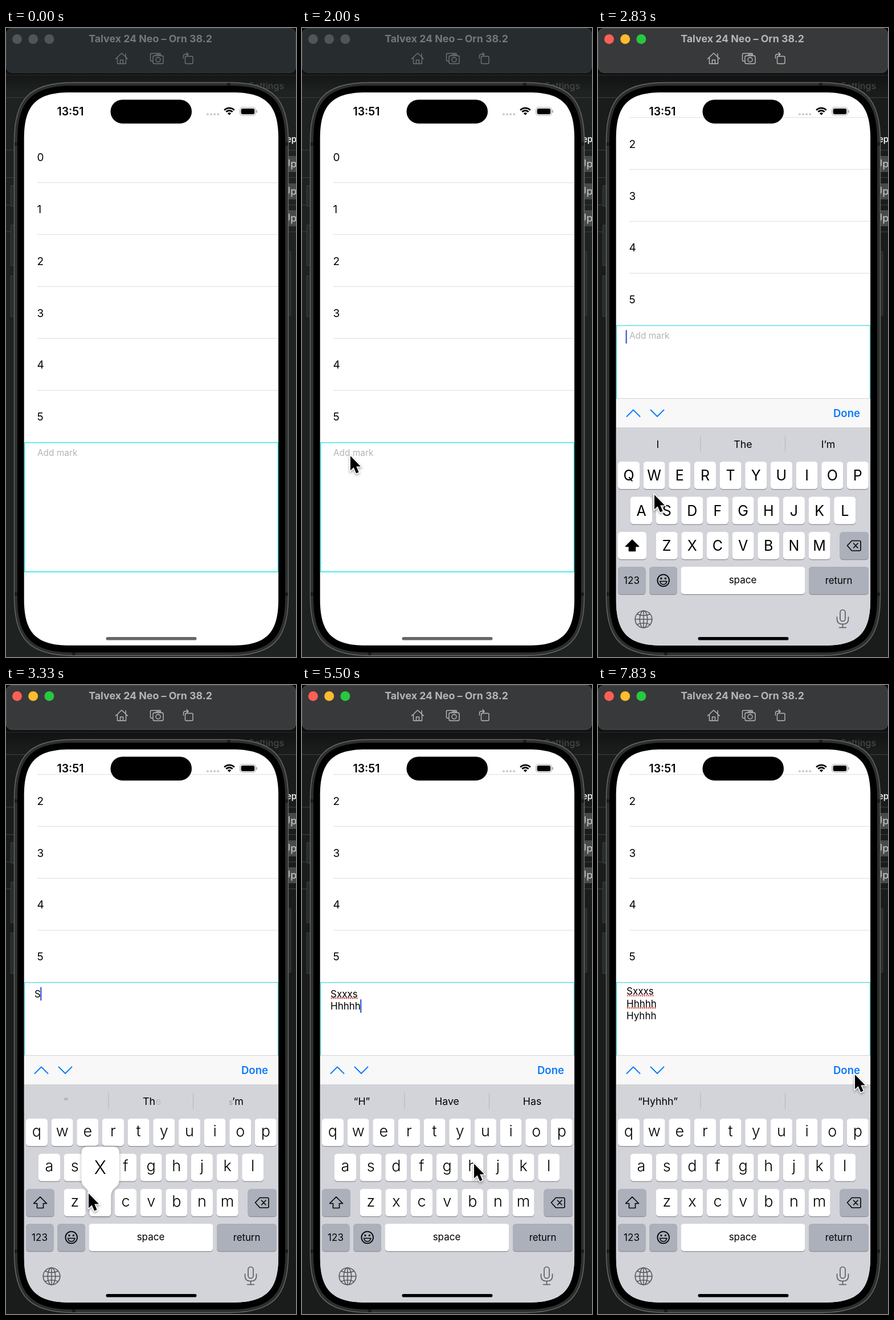
Recreate the animation shown at these times as an HTML page with a canvas. Size 509 by 1101 pixels, loop 8000 ms.

```html
<!DOCTYPE html>
<html lang="en">
<head>
<meta charset="utf-8">
<title>Text entry demo</title>
<style>
  html, body { margin: 0; width: 100%; height: 100%; overflow: hidden; background: #1b1e1e; }
  canvas { display: block; }
</style>
</head>
<body>
<canvas id="stage" width="509" height="1101"></canvas>
<script>
const ctx = document.getElementById('stage').getContext('2d');
const LOOP = 8000, STEPS_PER_MS = 6 / 1000;
const BLUE = '#0a7aff', KEY_GRAY = '#abb0bb', FONT = 'Inter, "Liberation Sans", sans-serif';
const ROWS = [
  { keys: 'qwertyuiop', x: 35, y: 759 },
  { keys: 'asdfghjkl', x: 57, y: 820.5 },
  { keys: 'zxcvbnm', x: 101.7, y: 882 }
];
const PITCH = 44.65, KEY_W = 38, KEY_H = 48;

// Pointer waypoints: step, x, y
const POINTER = [
  [1, 448, 1060], [8, 262, 935], [12, 84, 747], [15, 73, 743], [17, 98, 815],
  [19, 112, 846], [20, 144, 888], [23, 146, 890], [24, 112, 845], [25, 130, 850],
  [27, 415, 962], [28, 380, 930], [29, 302, 838], [33, 301, 836], [34, 370, 900],
  [35, 455, 964], [36, 450, 962], [37, 340, 870], [38, 298, 842], [39, 272, 785],
  [40, 290, 815], [41, 300, 846], [44, 301, 850], [46, 430, 705], [47, 450, 680]
];
const TYPED = [
  [0, ''], [20, 'S'], [21, 'Sx'], [22, 'Sxx'], [23, 'Sxxx'], [25, 'Sxxxs'], [28, 'Sxxxs\n'],
  [30, 'Sxxxs\nH'], [31, 'Sxxxs\nHh'], [32, 'Sxxxs\nHhhh'], [33, 'Sxxxs\nHhhhh'],
  [36, 'Sxxxs\nHhhhh\n'], [38, 'Sxxxs\nHhhhh\nH'], [40, 'Sxxxs\nHhhhh\nHy'],
  [42, 'Sxxxs\nHhhhh\nHyh'], [43, 'Sxxxs\nHhhhh\nHyhh'], [44, 'Sxxxs\nHhhhh\nHyhhh']
];
const STARTERS = ['I', 'The', 'I’m'];
const HINTS = [
  [0, STARTERS], [21, ['“Sx”', '', '']], [25, ['“Sxxxs”', '', '']], [28, STARTERS],
  [30, ['“H”', 'Have', 'Has']], [36, STARTERS], [38, ['“H”', 'How', 'He']],
  [42, ['“Hyh”', '', '']], [44, ['“Hyhhh”', '', '']]
];
const PRESSED = { 19: 'S', 20: 'X', 22: 'x', 24: 's', 29: 'H', 31: 'h', 39: 'y', 41: 'h', 43: 'h' };
const SCROLL = { 15: 54, 16: 183 }, SLIDE = { 15: 249, 16: 38 };

const latest = (list, step) => list.filter(e => e[0] <= step).pop()[1];

function text(str, x, y, size, color = '#000', weight = 400, align = 'left') {
  ctx.font = `${weight} ${size}px ${FONT}`;
  ctx.textAlign = align;
  ctx.fillStyle = color;
  ctx.fillText(str, x, y);
}
function rect(x, y, w, h, color) {
  ctx.fillStyle = color;
  ctx.fillRect(x, y, w, h);
}
function round(x, y, w, h, r, fill, stroke, width = 1) {
  ctx.beginPath();
  ctx.roundRect(x, y, w, h, r);
  paint(fill, stroke, width);
}
function paint(fill, stroke, width = 1) {
  if (fill) { ctx.fillStyle = fill; ctx.fill(); }
  if (stroke) { ctx.strokeStyle = stroke; ctx.lineWidth = width; ctx.stroke(); }
}
function disc(x, y, r, fill, stroke, width) {
  ctx.beginPath();
  ctx.arc(x, y, r, 0, Math.PI * 2);
  paint(fill, stroke, width);
}
function line(d, color, width = 1.6, fill) {
  ctx.lineJoin = ctx.lineCap = 'round';
  const path = new Path2D(d);
  if (fill) { ctx.fillStyle = fill; ctx.fill(path); }
  ctx.strokeStyle = color;
  ctx.lineWidth = width;
  ctx.stroke(path);
}

// Rounded rectangle with continuous-curvature corners
function smoothRect(x, y, w, h, r) {
  const e = r * 1.3, c = e * 0.269, R = x + w, B = y + h;
  ctx.beginPath();
  ctx.moveTo(x + e, y);
  ctx.lineTo(R - e, y);
  ctx.bezierCurveTo(R - c, y, R, y + c, R, y + e);
  ctx.lineTo(R, B - e);
  ctx.bezierCurveTo(R, B - c, R - c, B, R - e, B);
  ctx.lineTo(x + e, B);
  ctx.bezierCurveTo(x + c, B, x, B - c, x, B - e);
  ctx.lineTo(x, y + e);
  ctx.bezierCurveTo(x, y + c, x + c, y, x + e, y);
  ctx.closePath();
}

function drawBackdrop(active) {
  rect(0, 0, 509, 1101, active ? '#1a1c1c' : '#1e2221');
  for (const y of [82, 121, 213, 261, 309, 356]) rect(0, y, 509, 1.5, '#343737');
  text('Settings', 488, 107, 16, '#4b4e4e', 500, 'right');
  text('ep', 492, 200, 15, '#eee', 600);
  for (const y of [224, 272, 319]) {
    rect(490, y, 19, 28, '#484a4a');
    text('Up', 486, y + 20, 18, '#bfc0c0', 500);
  }
  for (const [y, h] of [[276, 36], [345, 71], [434, 71]]) round(8.5, y, 20, h, 1, '#282b2b', '#414444');
  round(480, 391, 20, 112, 1, '#282b2b', '#3b3e3e');
  const shade = ctx.createLinearGradient(0, 70, 0, 112);
  shade.addColorStop(0, 'rgba(0,0,0,.5)');
  shade.addColorStop(1, 'rgba(0,0,0,0)');
  rect(0, 70, 509, 42, shade);
}

function drawTitleBar(active) {
  const ink = active ? '#b9baba' : '#6f7375';
  rect(0, 0, 509, 10, '#0c0e0e');
  round(0.5, 0.5, 508, 77.5, 10, active ? '#38393a' : '#272c2e', active ? '#505152' : '#3a3f41');
  const lights = active ? ['#fe5f57', '#febc2e', '#28c840'] : ['#505557', '#505557', '#505557'];
  lights.forEach((c, i) => disc(19.5 + i * 28.2, 19.5, 8.5, c));
  text('Talvex 24 Neo – Orn 38.2', 253.5, 25, 17.8, active ? '#b5b6b6' : '#74787a', 700, 'center');
  line('M192.5 54 L203 44 L213.5 54 M195.5 52 V62.500 H210.500 V52 M200.500 62 V56 H205.500 V62 M210 50 V45', ink, 1.4);
  round(258, 48.5, 18, 14, 2.5, null, ink, 1.4);
  line('M257 58 H255.500 Q253.500 58 253.500 56 V46.500 Q253.500 44.500 255.500 44.500 H269.500 Q271.500 44.500 271.500 47 M263 48 L264.500 46.500 H269 L270.500 48', ink, 1.4);
  disc(267, 55.5, 4, null, ink, 1.4);
  round(314.5, 49.5, 13.5, 13, 2, null, ink, 1.4);
  line('M311.500 53 V49 Q311.500 46 315 46 H320 M317 43 L320 46 L317 49', ink, 1.4);
}

function drawPhone() {
  smoothRect(14.5, 95.5, 481, 1003, 79);
  paint('#2d2e2e', '#686969', 1.4);
  for (const y of [200, 988]) { rect(15, y, 6, 6, '#1a1b1b'); rect(489, y, 6, 6, '#1a1b1b'); }
  rect(388, 96, 6, 6, '#1a1b1b');
  rect(116, 1092, 6, 6, '#1a1b1b');
  smoothRect(20, 101, 470, 992, 74);
  paint('#000');
}

function drawField(step, top) {
  const cyan = step > 16 ? '#66dfdf' : '#3be9e9';
  ctx.strokeStyle = cyan;
  ctx.lineWidth = 1.6;
  ctx.strokeRect(32.6, top + 0.4, 444.9, 226.2);
  const content = latest(TYPED, step), lines = content.split('\n');
  const base = top + (lines.length > 2 ? 22 : 26.5);
  if (!content) text('Add mark', 55, top + 24, 15.4, '#b4b4b6');
  lines.forEach((str, i) => {
    const y = base + i * 21.5;
    text(str, 50, y, 17);
    const width = ctx.measureText(str).width;
    if (i < lines.length - 1) {
      for (let x = 52; x < 50 + width; x += 3.7) disc(x, y + 1.5, 1.35, '#e2544e');
    }
  });
  if (step < 15 || step === 47) return;
  const last = lines[lines.length - 1];
  const x = last ? 50 + ctx.measureText(last).width : 49.3;
  const y = base + (lines.length - 1) * 21.5;
  rect(x - 0.8, y - 18, 2.4, 23.5, '#4563d2');
}

function drawList(step) {
  const scroll = step < 15 ? 0 : SCROLL[step] ?? 205;
  for (let i = 0; i < 6; i++) {
    const y = 225.8 + i * 90.9 - scroll;
    text(String(i), 54.5, y + 7, 19);
    rect(55, y + 44.3, 423, 1.2, '#e3e3e5');
  }
  drawField(step, 725.3 - scroll);
}

function drawStatus() {
  text('13:51', 113, 153, 19.5, '#000', 600, 'center');
  round(183.5, 125.5, 142.5, 41.7, 20.8, '#000');
  for (let i = 0; i < 4; i++) disc(354 + i * 6.1, 151, 2.1, '#cbcbcd');
  ctx.lineCap = 'butt';
  for (const [r, w] of [[12.4, 2.8], [8, 2.8], [2.2, 4.4]]) {
    ctx.beginPath();
    ctx.arc(392, 152.5, r, -Math.PI * 0.75, -Math.PI * 0.25);
    paint(null, '#000', w);
  }
  round(410.7, 139, 27.5, 14, 4.5, null, '#a3a3a5', 1.1);
  round(412.6, 140.9, 23.7, 10.2, 3, '#000');
  round(439.3, 143.7, 1.6, 4.8, 1, '#a3a3a5');
}

function key(x, y, w, color = '#fff') {
  round(x, y + 1.3, w, KEY_H, 5.5, '#8b8d92');
  round(x, y, w, KEY_H, 5.5, color);
}

function drawLetters(upper) {
  for (const row of ROWS) [...row.keys].forEach((ch, i) => {
    const x = row.x + i * PITCH;
    key(x, row.y, KEY_W);
    if (upper) text(ch.toUpperCase(), x + 19, row.y + 33.3, 25, '#000', 400, 'center');
    else text(ch, x + 19, row.y + 30.5, 27, '#000', 300, 'center');
  });
}

function drawPopup(ch) {
  const row = ROWS.find(r => r.keys.includes(ch.toLowerCase()));
  const x = row.x + row.keys.indexOf(ch.toLowerCase()) * PITCH, y = row.y;
  const l = x - 14, r = x + 52.5, k = x + KEY_W, t = y - 74;
  ctx.save();
  ctx.shadowColor = 'rgba(0,0,0,.3)';
  ctx.shadowBlur = 5;
  ctx.fillStyle = '#fff';
  ctx.fill(new Path2D(`M${l + 11} ${t} H${r - 11} Q${r} ${t} ${r} ${t + 11} V${y - 16}
    C${r} ${y - 1} ${k} ${y - 4} ${k} ${y + 14} V${y + 42} Q${k} ${y + 48} ${k - 6} ${y + 48}
    H${x + 6} Q${x} ${y + 48} ${x} ${y + 42} V${y + 14}
    C${x} ${y - 4} ${l} ${y - 1} ${l} ${y - 16} V${t + 11} Q${l} ${t} ${l + 11} ${t} Z`));
  ctx.restore();
  text(ch, x + 19, y - 26, ch < 'a' ? 32 : 36, '#000', 300, 'center');
}

function drawHints(step) {
  const sliding = step === 15;
  ctx.save();
  if (sliding) {
    ctx.beginPath();
    ctx.rect(32, 700, 446, 25);
    ctx.clip();
    ctx.translate(0, -2);
  }
  for (const x of [179.5, 328]) rect(x, sliding ? 709 : 714, 1.1, sliding ? 16 : 28, '#b5b7bf');
  if (step === 20) {
    text('“', 105, 735, 17.8, '#9a9ca3', 400, 'center');
    text('The', 240, 735, 17.8, '#b9bbc1');
    text('Th', 240, 735, 17.8);
    text('s', 391, 735, 14, '#9a9ca3');
    text('’m', 397, 735, 17.8);
  } else {
    latest(HINTS, step).forEach((s, i) => text(s, 105 + i * 149.5, 735, 17.8, '#000', 400, 'center'));
  }
  ctx.restore();
}

function drawFunctionKeys(step, upper) {
  key(35, 882, 50, upper ? '#fff' : KEY_GRAY);
  line('M60 896 L71.500 907.500 H65.500 V915.500 H54.500 V907.500 H48.500 Z', '#000', 1.6, upper && '#000');
  key(424.5, 882, 50.5, KEY_GRAY);
  line('M437.500 906 L445.500 897.500 H459 Q461 897.500 461 899.500 V913 Q461 915 459 915 H445.500 Z M448.500 902 L456 910 M456 902 L448.500 910', '#000', 1.6);
  key(35, 943, 48.5, KEY_GRAY);
  key(90, 943, 49, KEY_GRAY);
  key(145.5, 943, 218);
  key(370, 943, 105, step === 27 || step === 35 ? '#fff' : KEY_GRAY);
  text('123', 59, 973, 17, '#000', 400, 'center');
  text('space', 254, 972, 17, '#000', 400, 'center');
  text('return', 422.5, 973, 16.8, '#000', 400, 'center');
  disc(114.7, 967, 10.3, null, '#000', 1.8);
  disc(111, 963.5, 1.7, '#000');
  disc(118.4, 963.5, 1.7, '#000');
  line('M108.500 968.500 H121 Q119.500 974 114.700 974 Q110 974 108.500 968.500 Z', '#000', 1.4);
  const ink = '#54575d';
  disc(80, 1035, 14.8, null, ink, 1.6);
  ctx.beginPath();
  ctx.ellipse(80, 1035, 6.8, 14.8, 0, 0, Math.PI * 2);
  paint(null, ink, 1.6);
  line('M65.200 1035 H94.800 M80 1020 V1050 M69 1026 Q80 1031 91 1026 M69 1044 Q80 1039 91 1044', ink, 1.5);
  round(425, 1018.5, 9, 20, 4.5, null, ink, 1.6);
  line('M419.500 1031 V1035 Q419.500 1043.500 429.500 1043.500 Q439.500 1043.500 439.500 1035 V1031 M429.500 1044 V1049.500 M423.500 1049.500 H435.500', ink, 1.6);
}

function drawKeyboard(step) {
  const upper = step < 20 || step === 28 || step === 29 || step === 36 || step === 37;
  ctx.save();
  ctx.translate(0, SLIDE[step] ?? 0);
  if (step > 15) {
    rect(32, 648, 446, 51, '#f8f8f8');
    rect(32, 648, 446, 1, '#d2d2d4');
    line('M50.500 680 L62 668.500 L73.500 680 M92.500 668.500 L104 680 L115.500 668.500', BLUE, 1.9);
    text('Done', 436.5, 681, 18.6, BLUE, 600, 'center');
  }
  rect(32, 699, 446, 390, '#d3d4da');
  drawHints(step);
  drawLetters(upper);
  drawFunctionKeys(step, upper);
  if (PRESSED[step]) drawPopup(PRESSED[step]);
  ctx.restore();
}

function drawPointer(step) {
  if (step < 1) return;
  const next = POINTER.findIndex(p => p[0] >= step);
  const b = POINTER[next], a = POINTER[Math.max(0, next - 1)];
  const mix = b === a ? 0 : (step - a[0]) / (b[0] - a[0]);
  ctx.save();
  ctx.translate(a[1] + (b[1] - a[1]) * mix, a[2] + (b[2] - a[2]) * mix);
  const arrow = new Path2D('M1 2 V27.500 L6.700 22.200 L11.200 32.500 L15.600 30.600 L11.300 20.500 H19 Z');
  ctx.lineJoin = 'miter';
  ctx.shadowColor = 'rgba(0,0,0,.4)';
  ctx.shadowBlur = 4;
  ctx.shadowOffsetY = 2;
  ctx.strokeStyle = '#fff';
  ctx.lineWidth = 3;
  ctx.stroke(arrow);
  ctx.shadowColor = 'transparent';
  ctx.fillStyle = '#000';
  ctx.fill(arrow);
  ctx.restore();
}

function draw(step) {
  const active = step >= 13;
  drawBackdrop(active);
  drawTitleBar(active);
  drawPhone();
  ctx.save();
  smoothRect(31.7, 112.8, 446.4, 968, 62);
  ctx.clip();
  rect(31, 112, 448, 970, '#fff');
  drawList(step);
  drawStatus();
  if (step >= 15) drawKeyboard(step);
  round(175.5, 1066, 159, 5.6, 2.8, step >= 15 ? '#000' : '#666');
  ctx.restore();
  drawPointer(step);
}

const start = performance.now();
function tick() {
  const t = Math.max(0, performance.now() - start) % LOOP;
  draw(Math.min(47, Math.floor((t + 4) * STEPS_PER_MS)));
  requestAnimationFrame(tick);
}
tick();
</script>
</body>
</html>
```
